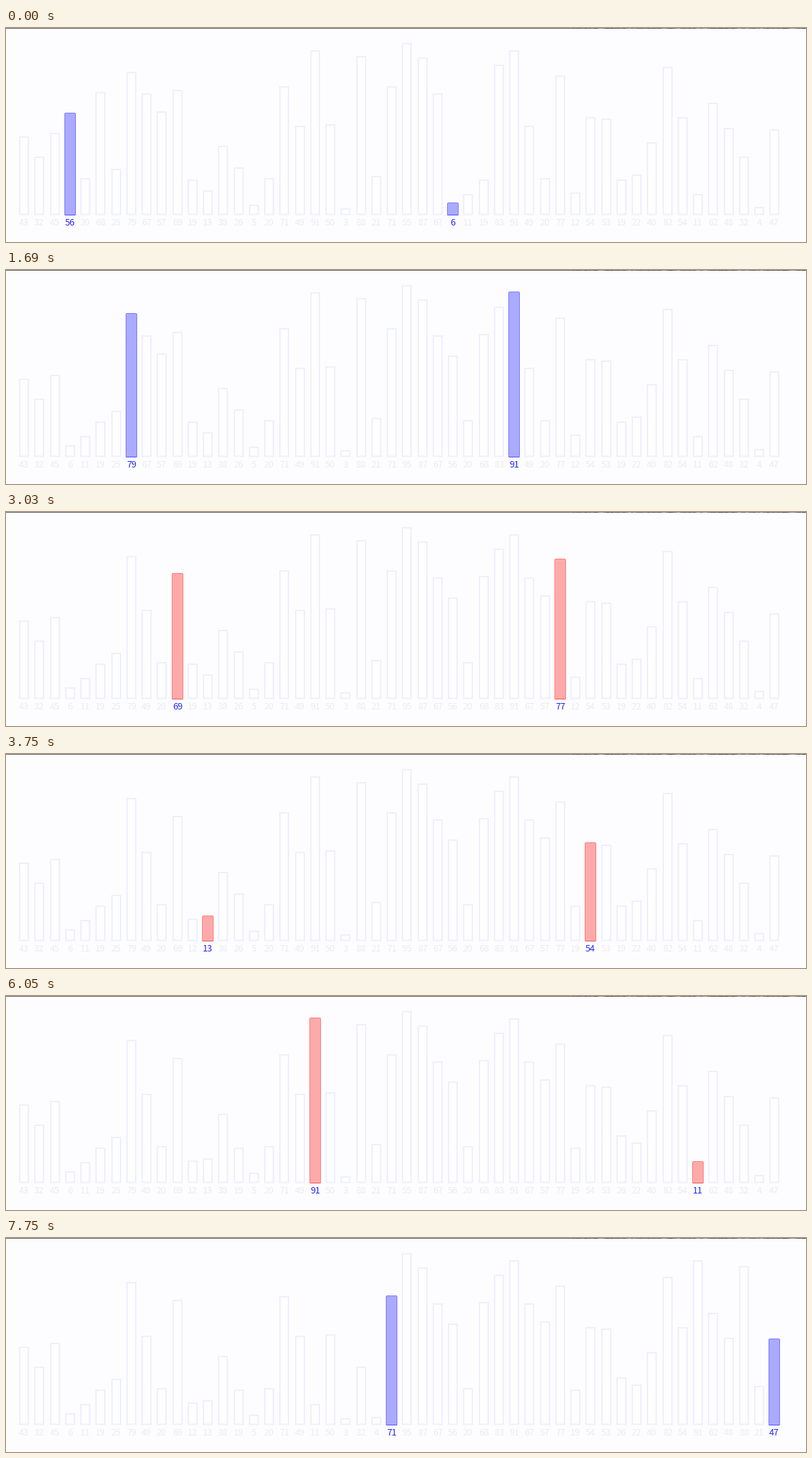
Recreate the animation shown at these times as a matplotlib script. Size 1110x298 px, loop 8000 ms.

```python
import math
import random

import matplotlib.pyplot as plt
from matplotlib.animation import FuncAnimation
from matplotlib.patches import Rectangle

W, H, DPI = 1110, 298, 100
PT = 72 / DPI  # points per pixel
LOOP, TICK = 8000, 20
STEP, PAUSE = 120, 125
GAP, FIRST = 25, 3
BASE, BAR_W = 260.5, 14

BG = "#fdfdff"
GHOST_EDGE, GHOST_FILL, GHOST_TEXT = "#efefff", "#fefeff", "#ececef"
LABEL = "#2626fa"
BLUE, RED = ("#aaaaff", "#0000ff"), ("#ffaaaa", "#ff0000")

# The numbers being sorted, as printed below the bars
VALUES = [
    43, 32, 45, 56, 20, 68, 25, 79, 67, 57, 69, 19, 13, 38, 26, 5, 20,
    71, 49, 91, 50, 3, 88, 21, 71, 95, 87, 67, 6, 11, 19, 83, 91, 49,
    20, 77, 12, 54, 53, 19, 22, 40, 82, 54, 11, 62, 48, 32, 4, 47,
]


def shell_pass(values):
    """Yield (values, index, phase) for one pass of shell sort."""
    values = list(values)
    for i in range(FIRST, GAP):
        j = i + GAP
        yield tuple(values), i, "compare"
        yield tuple(values), i, "test"
        if values[i] > values[j]:
            yield tuple(values), i, "swap"
            values[i], values[j] = values[j], values[i]


def start_time(n):
    """Steps are evenly spaced, with a pause after every 4.33 on average."""
    if n == 0:
        return 0
    pauses = math.ceil((n - 0.34) / 4.33) - 1
    return STEP * (n + 1) + PAUSE * pauses


STATES = [(start_time(n), s) for n, s in enumerate(shell_pass(VALUES))]


def left(i):
    return math.floor(18.5 + 21.25 * i)


def top(v):
    return math.ceil(258.5 - 2.5 * v)


fig = plt.figure(figsize=(W / DPI, H / DPI), dpi=DPI, facecolor=BG)
ax = fig.add_axes([0, 0, 1, 1])
ax.set_xlim(0, W)
ax.set_ylim(H, 0)
ax.axis("off")


def make_rect(fill, edge, width, z):
    return ax.add_patch(Rectangle((0, 0), 1, 1, fc=fill, ec=edge, lw=width * PT,
                                  joinstyle="miter", snap=False, zorder=z))


def make_label(x, color, z):
    return ax.text(x, 275.2, "", color=color, fontsize=12.6 * PT, ha="center",
                   va="baseline", family="Noto Sans CJK JP", zorder=z)


def place(rect, x, v, inset=0):
    y = top(v) + inset
    rect.set_bounds(x + inset, y, BAR_W - 2 * inset, BASE - inset - y)


def strip(x, w, color):
    ax.add_patch(Rectangle((x, 0), w, 1, fc=color, lw=0, snap=False, zorder=5))


# Window edge along the top, broken up at the right
strip(0, W, "#686868")
rng = random.Random(4)
x = 786
while x < W:
    w = rng.randint(2, 7)
    strip(x, w, rng.choice(["#484848", "#555555", "#8c8c8c"]))
    x += w + rng.randint(2, 6)

ghosts = [make_rect(GHOST_FILL, GHOST_EDGE, 2, 1) for _ in VALUES]
names = [make_label(left(i) + BAR_W / 2, GHOST_TEXT, 2) for i in range(len(VALUES))]
# The fill lies over the inner half of its outline
outlines = [make_rect("none", BG, 1, z) for z in (3, 3.5)]
fills = [make_rect(BG, "none", 0, z) for z in (3.1, 3.6)]
tags = [make_label(0, LABEL, 4) for _ in range(2)]


def update(n):
    now = n * TICK + TICK / 2
    values, i, phase = [s for t, s in STATES if t <= now][-1]
    pair = (i, i + GAP)

    for k, v in enumerate(values):
        place(ghosts[k], left(k), v, 1)
        names[k].set_text(str(v))
        ghosts[k].set_visible(k not in pair)
        names[k].set_visible(k not in pair)

    color, edge = BLUE if phase == "compare" else RED
    middle = sum(map(left, pair)) / 2
    for k, outline, fill, tag in zip(pair, outlines, fills, tags):
        pos = middle if phase == "swap" else left(k)
        place(outline, pos, values[k])
        place(fill, pos, values[k])
        outline.set_edgecolor(edge)
        fill.set_facecolor(color)
        tag.set_x(pos + BAR_W / 2)
        tag.set_text(str(values[k]))
    return ghosts + names + outlines + fills + tags


anim = FuncAnimation(fig, update, frames=LOOP // TICK, interval=TICK,
                     repeat=True, repeat_delay=0, blit=False)
plt.show()
```
